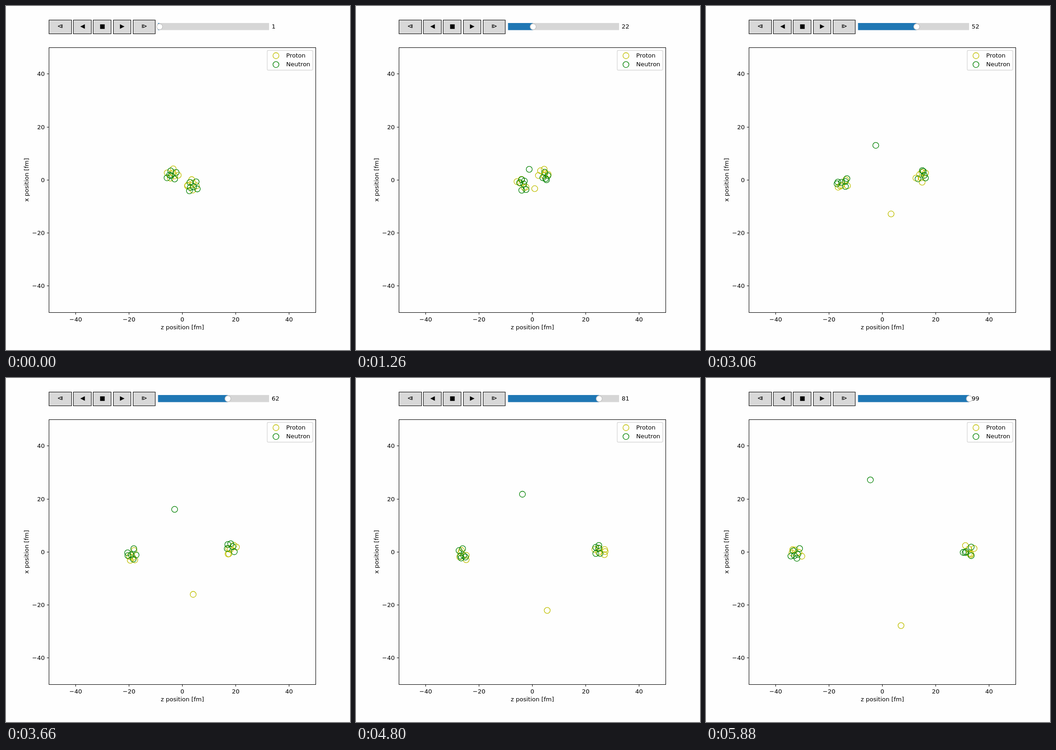
An HTML page with a canvas that plays this animation: 748 px wide and 748 px high, repeating every 5.94 s.

```html
<!DOCTYPE html>
<html lang="en">
<head>
<meta charset="utf-8">
<title>Nucleon positions</title>
<style>
html, body { margin: 0; width: 100%; height: 100%; overflow: hidden; background: #fefefe; }
canvas { display: block; }
</style>
</head>
<body>
<canvas id="stage" width="748" height="748"></canvas>
<script>
const ctx = document.getElementById('stage').getContext('2d');
const STEP = 60, COUNT = 99, BOUND = 11;
const PROTON = '#bfbf00', NEUTRON = '#008000';
const COLLISION = 11;

// Knocked-out nucleons: z, x in fm at the start, at the collision and at the end.
const STRAYS = [
  { color: PROTON, points: [[2, -2], [0, 0.2], [7, -27.8]] },
  { color: NEUTRON, points: [[-4.3, 1.6], [-0.7, 0.7], [-4.5, 27.2]] }
];

const toX = z => 383.5 + 5.8 * z;
const toY = x => 378.2 - 5.76 * x;
const crisp = v => Math.floor(v) + 0.5;

function random(seed) {
  const v = Math.sin(seed * 12.9898) * 43758.5453;
  return v - Math.floor(v);
}

// Two nuclei drift past each other while their nucleons circle inside.
function nucleus(side, n) {
  const z = side * (0.368 * (n - 1) - 3.9);
  const x = side * (2.1 - 0.016 * (n - 1));
  return Array.from({ length: BOUND }, (_, i) => {
    const seed = i + 1 + 20 * side;
    const size = 2.4 * Math.sqrt((i + 0.7) / BOUND);
    const rate = (0.04 + 0.04 * random(seed)) * (random(seed + 0.5) < 0.5 ? -1 : 1);
    const angle = 2.4 * i + side + rate * (n - 1);
    return {
      color: (i % 2 === 0) === (side > 0) ? PROTON : NEUTRON,
      z: z + size * Math.cos(angle),
      x: x + size * Math.sin(angle)
    };
  });
}

function stray({ color, points }, n) {
  const late = n > COLLISION;
  const [from, to] = late ? points.slice(1) : points;
  const u = late ? (n - COLLISION) / (COUNT - COLLISION) : (n - 1) / (COLLISION - 1);
  const mix = axis => from[axis] + (to[axis] - from[axis]) * u;
  return { color, z: mix(0), x: mix(1) };
}

function text(str, x, y, align = 'center') {
  ctx.fillStyle = '#000';
  ctx.textAlign = align;
  ctx.fillText(str, x, y);
}

function line(x1, y1, x2, y2) {
  ctx.beginPath();
  ctx.moveTo(x1, y1);
  ctx.lineTo(x2, y2);
  ctx.stroke();
}

function ring(x, y, color, fill) {
  ctx.beginPath();
  ctx.arc(x, y, 6.5, 0, 2 * Math.PI);
  if (fill) {
    ctx.fillStyle = fill;
    ctx.fill();
  }
  ctx.strokeStyle = color;
  ctx.lineWidth = 1.3;
  ctx.stroke();
}

function drawButtons() {
  let x = 93.5;
  for (const icon of '⧏◀■▶⧐') {
    const w = '⧏⧐'.includes(icon) ? 48.5 : 38.5;
    const left = crisp(x), right = crisp(x + w);
    ctx.fillStyle = '#d8d8d8';
    ctx.fillRect(left, 30.5, right - left, 30);
    ctx.strokeRect(left, 30.5, right - left, 30);
    text(icon, x + w / 2 + 0.5, 48);
    x += w + 4.67;
  }
}

function drawSlider(n) {
  const length = n * 241 / COUNT;
  ctx.fillStyle = '#d6d6d6';
  ctx.fillRect(331, 37, 241, 15.4);
  ctx.fillStyle = '#1f77b4';
  ctx.fillRect(330.5, 37, length + 0.5, 15.4);
  ring(331.6 + length, 45, '#bfbfbf', '#fff');
  text(n, 577.7, 48.8, 'left');
}

function drawNucleons(n) {
  const all = [...nucleus(1, n), ...nucleus(-1, n), ...STRAYS.map(s => stray(s, n))];
  for (const color of [PROTON, NEUTRON]) {
    for (const p of all) if (p.color === color) ring(toX(p.z), toY(p.x), color);
  }
}

function drawAxes() {
  ctx.strokeStyle = '#000';
  ctx.lineWidth = 1.04;
  ctx.strokeRect(93.5, 90.5, 580, 576);
  for (let v = -40; v <= 40; v += 20) {
    const x = crisp(toX(v)), y = crisp(toY(v));
    const label = String(v).replace('-', '\u2212');
    line(x, 666.5, x, 671);
    line(89, y, 93.5, y);
    text(label, toX(v), 685.7);
    text(label, 84.3, toY(v) + 4.6, 'right');
  }
  text('z position [fm]', 383.5, 703);
  ctx.save();
  ctx.translate(48.8, 378.2);
  ctx.rotate(-Math.PI / 2);
  text('x position [fm]', 0, 0);
  ctx.restore();
}

function drawLegend() {
  ctx.beginPath();
  ctx.roundRect(568, 96.5, 99, 43, 2.6);
  ctx.fillStyle = '#fefefe';
  ctx.fill();
  ctx.strokeStyle = '#d6d6d6';
  ctx.lineWidth = 1.3;
  ctx.stroke();
  [['Proton', PROTON], ['Neutron', NEUTRON]].forEach(([name, color], i) => {
    ring(587, 108 + 19.3 * i, color);
    text(name, 609.3, 112 + 19 * i, 'left');
  });
}

function draw() {
  const n = Math.floor(performance.now() / STEP) % COUNT + 1;
  ctx.fillStyle = '#fefefe';
  ctx.fillRect(0, 0, 748, 748);
  ctx.font = '13px "DejaVu Sans", sans-serif';
  ctx.strokeStyle = '#000';
  ctx.lineWidth = 1.04;
  drawButtons();
  drawSlider(n);
  drawNucleons(n);
  drawAxes();
  drawLegend();
  requestAnimationFrame(draw);
}
draw();
</script>
</body>
</html>
```
